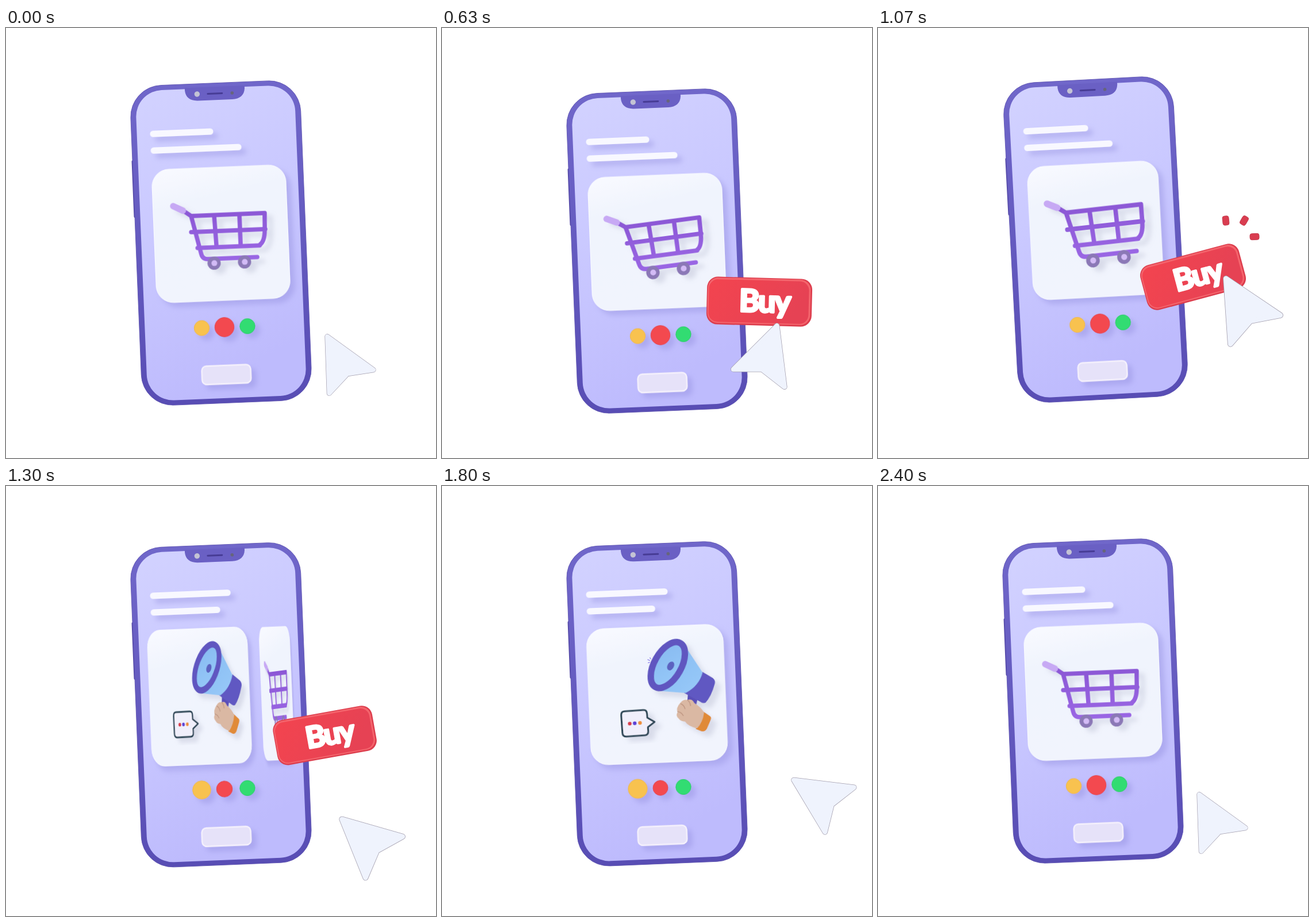
Recreate the animation shown at these times as an HTML page. Size 748 by 748 pixels, loop 2430 ms.

```html
<!DOCTYPE html>
<html lang="en">
<head>
<meta charset="utf-8">
<title>Shop on the phone</title>
<style>
html, body { margin: 0; width: 100%; height: 100%; overflow: hidden; background: #fff; }
svg { display: block; width: 100vw; height: 100vh; }
.label { font: 700 54px Lato, sans-serif; letter-spacing: -2px; fill: #fff; stroke: #fff; stroke-width: 4; stroke-linejoin: round; }
.bars { fill: none; stroke: url(#violet); stroke-width: 7.5; stroke-linecap: round; stroke-linejoin: round; }
</style>
</head>
<body>
<svg viewBox="0 0 748 748">
  <defs>
    <linearGradient id="frame" x2="0" y2="1"><stop stop-color="#7067ca"/><stop offset="1" stop-color="#584db4"/></linearGradient>
    <linearGradient id="screen" x2=".25" y2="1"><stop stop-color="#d2d2ff"/><stop offset=".45" stop-color="#cac9ff"/><stop offset="1" stop-color="#bebbfd"/></linearGradient>
    <linearGradient id="card" x2=".2" y2="1"><stop stop-color="#f9faff"/><stop offset=".3" stop-color="#f0f4fd"/><stop offset="1" stop-color="#f1f4fd"/></linearGradient>
    <linearGradient id="violet" gradientUnits="userSpaceOnUse" x1="0" y1="-50" x2="0" y2="30"><stop stop-color="#8c58d6"/><stop offset="1" stop-color="#9a66e4"/></linearGradient>
    <linearGradient id="red" x2="1" y2=".3"><stop stop-color="#f3444f"/><stop offset="1" stop-color="#e64254"/></linearGradient>
    <linearGradient id="cone" x2="1" y2="1"><stop stop-color="#86b9f0"/><stop offset="1" stop-color="#98caf9"/></linearGradient>
    <filter id="soft" x="-30%" y="-30%" width="170%" height="190%"><feDropShadow dx="8" dy="8" stdDeviation="5" flood-color="#918cdd" flood-opacity=".42"/></filter>
    <filter id="faint" x="-20%" y="-20%" width="150%" height="150%"><feDropShadow dx="10" dy="8" stdDeviation="4" flood-color="#9a9cb8" flood-opacity=".28"/></filter>
  </defs>

  <g id="phone">
    <rect x="-149.5" y="-150" width="6" height="100" rx="2" fill="#564ba9"/>
    <rect x="-148" y="-278.5" width="296" height="557" rx="55" fill="url(#frame)" stroke="#5a4fae" stroke-width=".8"/>
    <rect x="-138.5" y="-270" width="277" height="540" rx="46" fill="url(#screen)"/>
    <path d="M-52-272H52V-267C51-255 43-249 30-249H-30C-43-249-51-255-52-267Z" fill="#6a60c4"/>
    <circle cx="-31" cy="-260.5" r="4.7" fill="#c3c3d4"/>
    <rect x="-14" y="-261.8" width="28" height="3" rx="1.5" fill="#473c95"/>
    <circle cx="30" cy="-260" r="2.8" fill="#66657c"/>

    <g fill="#f8f8ff" filter="url(#soft)">
      <rect id="line1" x="-115.6" y="-200" height="11" rx="5.5"/>
      <rect id="line2" x="-115.6" y="-171" height="11" rx="5.5"/>
    </g>

    <g id="cartCard">
      <rect x="-116.5" y="-116" width="233" height="232" rx="30" fill="url(#card)" stroke="#fafbff" filter="url(#soft)"/>
      <g transform="translate(-.7 16)"><g id="cart" filter="url(#faint)">
        <path class="bars" d="M-65-60L-50-49H78M-50-49L-35 18Q-33 27-24 27H62M-51-21H78M-41 7H67M78-49L77-20Q76 1 67 6M-10-48L-8 6M34-48V6"/>
        <path d="M-80.4-67.4L-64-59" stroke="#c7a9f4" stroke-width="11" stroke-linecap="round"/>
        <g fill="#8b78b6"><circle cx="-13.4" cy="34.6" r="11.5"/><circle cx="39.6" cy="34.6" r="11.5"/></g>
        <g fill="#d3bbf6"><circle cx="-13" cy="34.6" r="5"/><circle cx="40" cy="34.6" r="5"/></g>
      </g></g>
    </g>

    <g id="horn">
      <rect x="-116.5" y="-116" width="233" height="232" rx="30" fill="url(#card)" stroke="#fafbff" filter="url(#soft)"/>
      <g transform="translate(-.7 16) rotate(2.35)">
        <g id="rays" stroke="#9d91ef" stroke-width="9" stroke-linecap="round"><path d="M-28-116L-21-103M-52-95L-30-85M-47-61L-32-65"/></g>
        <g id="bubble" filter="url(#faint)">
          <path d="M-16-21.5H16Q22-21.5 22-15V-8L34 0L22 8V15Q22 21.5 16 21.5H-16Q-22 21.5-22 15V-15Q-22-21.5-16-21.5Z" fill="#f0effb" stroke="#2f4656" stroke-width="3" stroke-linejoin="round"/>
          <circle cx="-8.5" r="3.2" fill="#d93b4a"/><circle r="3.2" fill="#5b3fd6"/><circle cx="9" r="3.2" fill="#ee8f3c"/>
        </g>
        <g id="mega" filter="url(#faint)">
          <path d="M50-25L68-18L65 6H50Z" fill="#5a50b8"/>
          <path d="M72-56L90-47Q96-43 94-36Q90-15 81-4Q77-2 72-5L43-18Z" fill="#6158c2"/>
          <path d="M40-96L72-55Q68-32 46-18L-4-18Z" fill="url(#cone)"/>
          <g transform="translate(12 -63) rotate(25)">
            <ellipse rx="23" ry="43" fill="url(#cone)" stroke="#6057c0" stroke-width="11"/>
            <ellipse cx="5" cy="-1" rx="5.5" ry="8" fill="#5c62c0"/>
          </g>
          <path d="M78 11L90 18Q94 20 92 25L87 40Q84 46 78 45L68 42Z" fill="#e08a38"/>
          <path d="M38 0Q43-8 50-6Q57-10 62-2Q74 4 80 13Q79 30 70 41Q54 38 49 31Q41 31 38 27Q31 22 35 16Q31 9 38 0Z" fill="#dab8a3"/>
          <path d="M39 1Q45 3 47 9M35 15Q41 15 45 21M50-6Q55-3 56 3" fill="none" stroke="#bf9783" stroke-width="1.5" stroke-linecap="round"/>
        </g>
      </g>
    </g>

    <g filter="url(#soft)">
      <circle id="yellow" cx="-39.5" cy="146.5" fill="#f8c250" stroke="#efb647"/>
      <circle id="ruby" cy="146.5" fill="#f34a4f" stroke="#e3434b"/>
      <circle id="green" cx="40" cy="146.5" fill="#30dc72" stroke="#29cb68"/>
    </g>
    <rect x="-42.5" y="213" width="85" height="32" rx="8" fill="#e6e2f9" stroke="#f5f1fc" stroke-width="2.5" filter="url(#soft)"/>
  </g>

  <g id="buy">
    <rect x="-91.5" y="-41.5" width="183" height="83" rx="19" fill="#dc3d4d"/>
    <rect x="-90" y="-40" width="179" height="79" rx="18" fill="#f4646c"/>
    <rect x="-88" y="-37" width="174" height="74" rx="16" fill="url(#red)"/>
    <text class="label" x="9" y="18" text-anchor="middle">Buy</text>
  </g>

  <g id="burst" fill="#d93d50" stroke="#bf3347" stroke-width=".8"></g>

  <g id="cursor" stroke-linejoin="round">
    <path id="arrow" d="M4 0L93-43.5L78 0L93 43.5Z" stroke="#a29dad" stroke-width="9"/>
    <path d="M4 0L93-43.5L78 0L93 43.5Z" fill="#eff3fd" stroke="#eff3fd" stroke-width="7.6"/>
  </g>
</svg>
<script>
const LOOP = 2430, SPAN = 2400;
const $ = id => document.getElementById(id);
const move = (id, value) => $(id).setAttribute('transform', value);

// Smooth cyclic curve through [time, ...values]; never overshoots its keys.
function track(keys) {
  const n = keys.length;
  const key = (i, c) => {
    const turn = Math.floor(i / n), k = keys[i - turn * n];
    return c ? k[c] : k[0] + turn * SPAN;
  };
  const slope = (i, c) => (key(i + 1, c) - key(i, c)) / (key(i + 1, 0) - key(i, 0));
  const tangent = (i, c) => {
    const a = slope(i - 1, c), b = slope(i, c);
    return a * b <= 0 ? 0 : 2 * a * b / (a + b);
  };
  return t => {
    let i = n - 1;
    while (i >= 0 && key(i, 0) > t) i--;
    const h = key(i + 1, 0) - key(i, 0), u = (t - key(i, 0)) / h, v = 1 - u;
    return keys[0].slice(1).map((_, j) => {
      const c = j + 1;
      return v * v * (1 + 2 * u) * key(i, c) + u * u * (3 - 2 * u) * key(i + 1, c)
        + h * u * v * (v * tangent(i, c) - u * tangent(i + 1, c));
    });
  };
}

const bob = track([[0, 0], [270, 11], [500, 18], [630, 14], [950, -9], [1070, -6], [1570, 18], [2030, -13], [2065, -14], [2170, -9]]);
const knock = track([[0, 0, 0], [800, 0, 0], [940, -9, -6], [1070, 4.5, -.7], [1180, 0, 0]]);
const lines = track([[0, 110, 158], [1040, 110, 158], [1070, 113, 154], [1350, 142, 119], [2030, 142, 119.5], [2330, 110, 158]]);
const dots = track([[0, 13.2, 16.8], [1070, 13.2, 16.8], [1400, 16.6, 13], [1880, 16.6, 13], [2030, 11.3, 14.3], [2250, 13.2, 16.8]]);
const cartTurn = track([[0, 0], [1040, 0], [1070, .14], [1420, 1], [1990, 1], [2030, .984], [2330, 0]]);
const hornTurn = track([[0, -1], [1130, -1], [1460, 0], [1850, 0], [2030, -.24], [2330, -1]]);
const cart = track([[0, 0, 0, 1], [270, 11.5, -5, 1.01], [630, 5, -5.2, 1.01], [1070, 8, -3.3, 1.05], [1500, 0, 0, 1]]);
const mega = track([[1300, 4], [1570, 0], [2030, 9]]);
const bubble = track([[1300, 32, -3], [1570, 36, -8], [2030, 30, 0]]);
const rays = track([[0, 0], [1360, 0], [1520, 1], [1680, 1], [1840, 0]]);
const buy = track([[40, 440, 490, 0, 0], [270, 510, 467, -12, 1.06], [630, 552, 476, 1.5, 1], [930, 548, 446, -12, .92], [1070, 548, 433, -15, .97], [1350, 556, 434, -9, .95], [1570, 560, 434, -5, .515], [1660, 562, 434, -3, 0]]);
const burst = track([[0, .2, 0], [920, .2, 0], [980, .6, 1], [1070, 1, 1], [1200, 1.25, 0]]);
const cursor = track([[0, 557, 533, 62, 1], [270, 515, 570, 96, 1], [400, 522, 594, 112, 1.02], [630, 584, 514, 109, 1.08], [860, 632, 462, 64, 1.15], [1070, 603, 432, 60, 1.15], [1350, 578, 590, 38, 1.1], [1570, 570, 569, 24, 1.08], [1850, 612, 498, 36, 1.06], [2030, 607, 472, 53, 1.045]]);

const bits = [[0, -33, -6], [32, -33, 30], [50, -5, 88]].map(([x, y, a]) => {
  const el = document.createElementNS('http://www.w3.org/2000/svg', 'rect');
  for (const [k, v] of Object.entries({ x: -5.5, y: -8, width: 11, height: 16, rx: 3.5 })) el.setAttribute(k, v);
  $('burst').append(el);
  return { el, x, y, a };
});

// Cards swing edge-on while sliding towards the side of the screen.
function turnCard(id, p, size) {
  const x = .7 + Math.sign(p) * 120 * Math.max(0, (Math.abs(p) - .24) / .76);
  const narrow = Math.cos(p * Math.PI / 2);
  $(id).style.display = Math.abs(p) > .998 ? 'none' : '';
  move(id, `translate(${x} -16) scale(${Math.max(narrow, .001) * size} ${size})`);
}

function draw(time) {
  const t = Math.min(time % LOOP, SPAN);
  const [dx, tilt] = knock(t);
  move('phone', `translate(${374 + dx} ${374 + bob(t)[0]}) rotate(${tilt - 2.35})`);

  const [w1, w2] = lines(t), [ry, rr] = dots(t);
  $('line1').setAttribute('width', w1);
  $('line2').setAttribute('width', w2);
  $('yellow').setAttribute('r', ry);
  $('ruby').setAttribute('r', rr);
  $('green').setAttribute('r', 13.2);

  turnCard('cartCard', cartTurn(t)[0], 1);
  turnCard('horn', hornTurn(t)[0], 1.02);
  const [cx, ca, cs] = cart(t);
  move('cart', `translate(${13 + cx} 34.6) rotate(${ca}) scale(${cs}) translate(-13 -34.6)`);
  move('mega', `rotate(${mega(t)[0]} 58 18)`);
  const [by, ba] = bubble(t);
  move('bubble', `translate(-38 ${by}) rotate(${ba})`);
  const ray = rays(t)[0];
  $('rays').style.display = ray < .01 ? 'none' : '';
  move('rays', `translate(-9 -72) scale(${ray}) translate(9 72)`);

  const [x, y, a, s] = buy(t);
  $('buy').style.display = s < .01 ? 'none' : '';
  move('buy', `translate(${x} ${y}) rotate(${a}) scale(${s})`);

  const [far, size] = burst(t);
  $('burst').style.display = size < .01 ? 'none' : '';
  for (const b of bits)
    b.el.setAttribute('transform', `translate(${605 + b.x * far} ${368 + b.y * far}) rotate(${b.a}) scale(${size})`);

  const [px, py, pa, ps] = cursor(t);
  move('cursor', `translate(${px} ${py}) rotate(${pa}) scale(${ps})`);
}

let start;
function tick(now) {
  start ??= now;
  draw(now - start);
  requestAnimationFrame(tick);
}
draw(0);
requestAnimationFrame(tick);
</script>
</body>
</html>
```
